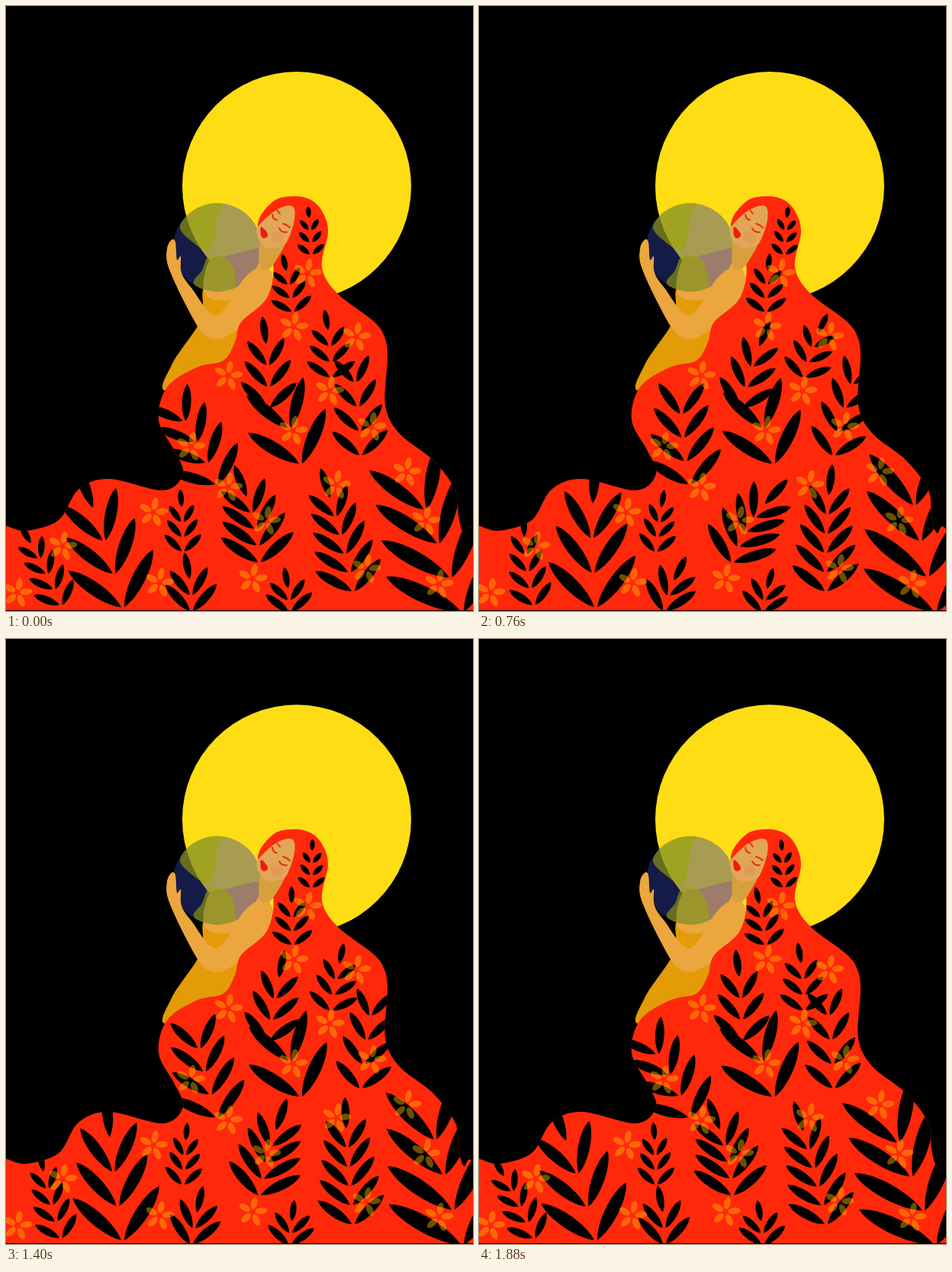
These frames come from a looping animation (612 px wide and 792 px high, 1.92 s). An HTML page with a canvas:

```html
<!DOCTYPE html>
<html lang="en">
<head>
<meta charset="utf-8">
<title>Sun, earth and swaying leaves</title>
<style>
html, body { margin: 0; width: 100%; height: 100%; overflow: hidden; background: #000; }
canvas { display: block; }
</style>
</head>
<body>
<canvas id="stage" width="612" height="792"></canvas>
<script>
const ctx = document.getElementById('stage').getContext('2d');
const LOOP = 1920, STEP = 40, TAU = Math.PI * 2, DEG = Math.PI / 180;
const SKIN = '#eca63e';

// Smooth closed path through x,y pairs
function blob(...p) {
  const path = new Path2D(), n = p.length / 2;
  const at = i => { const j = (i + n) % n * 2; return [p[j], p[j + 1]]; };
  path.moveTo(p[0], p[1]);
  for (let i = 0; i < n; i++) {
    const [a, b, c, d] = [at(i - 1), at(i), at(i + 1), at(i + 2)];
    path.bezierCurveTo(
      b[0] + (c[0] - a[0]) / 6, b[1] + (c[1] - a[1]) / 6,
      c[0] - (d[0] - b[0]) / 6, c[1] - (d[1] - b[1]) / 6, c[0], c[1]);
  }
  path.closePath();
  return path;
}

function disc(x, y, r) {
  const path = new Path2D();
  path.arc(x, y, r, 0, TAU);
  return path;
}

function fill(path, color) {
  ctx.fillStyle = color;
  ctx.fill(path);
}

const sun = disc(381, 236, 150), globe = disc(277, 316, 58);
const torso = blob(262,366, 310,350, 335,380, 300,470, 211,504, 217,470, 251,419, 258,395);
const chest = blob(266,334, 290,327, 335,317, 348,330, 335,365, 290,385, 260,376);
const arm = blob(217,306, 211,318, 213,342, 236,392, 257,427, 276,436, 297,428, 330,404,
  350,365, 343,342, 329,343, 310,359, 276,405, 243,369, 230,349, 229,328, 224,332, 222,309);
const north = blob(228,291, 236,275, 250,260, 284,258, 277,274, 274,300, 265,321, 242,307);
const south = blob(264,329, 276,326, 290,331, 300,350, 298,372, 270,376, 246,363, 257,346);
const face = blob(375,262, 378,280, 368,309, 357,316, 344,317, 334,310, 329,299, 331,288, 354,267);
const neck = blob(333,310, 347,314, 366,309, 354,333, 345,343, 333,342);
const lips = blob(334,289, 341,295, 343,301, 338,304, 334,300);
const lids = new Path2D('M349 273Q350 280 355 280M358 291Q361 297 368 296M363 285Q368 286 372 290M355 267L359 272');
const dress = blob(377,249, 400,254, 415,270, 422,296, 414,342, 434,376, 481,412, 496,433,
  500,460, 497,522, 515,559, 560,595, 589,634, 593,668, 600,690, 612,685, 650,760, 620,820,
  -20,820, -40,720, -12,681, 25,687, 69,673, 95,633, 135,619, 206,634, 232,612, 220,581,
  200,542, 211,499, 250,473, 285,464, 300,440, 308,414, 342,382, 350,336, 330,288, 350,256);

// Angles in degrees from upright; bend is how far the top turns over the sway
const ferns = [
  { x: 400, y: 325, h: 48, lean: 0, bend: 14, pairs: 3, len: 20, spread: 50 },
  { x: 376, y: 400, h: 54, lean: -4, bend: 22, pairs: 3, len: 30, spread: 54 },
  { x: 344, y: 526, h: 84, lean: 6, bend: 34, pairs: 3, len: 48, spread: 46 },
  { x: 386, y: 599, h: 98, lean: -17, bend: 6, pairs: 2, len: 78, spread: 41, tip: false },
  { x: 426, y: 486, h: 62, lean: 6, bend: 40, pairs: 3, len: 36, spread: 55 },
  { x: 465, y: 588, h: 128, lean: 4, bend: 38, pairs: 4, len: 47, spread: 47, tip: false },
  { x: 276, y: 626, h: 124, lean: -18, bend: 42, pairs: 4, len: 60, spread: 50, tip: false },
  { x: 72, y: 784, h: 90, lean: -18, bend: 32, pairs: 4, len: 36, spread: 46 },
  { x: 153, y: 787, h: 136, lean: -10, bend: 28, pairs: 3, len: 84, spread: 41 },
  { x: 232, y: 714, h: 58, lean: 2, bend: 16, pairs: 3, len: 31, spread: 45 },
  { x: 243, y: 792, h: 42, lean: 6, bend: 42, pairs: 2, len: 47, spread: 42 },
  { x: 332, y: 728, h: 88, lean: 7, bend: 72, pairs: 4, len: 58, spread: 52 },
  { x: 455, y: 766, h: 126, lean: -7, bend: 27, pairs: 5, len: 54, spread: 50 },
  { x: 598, y: 793, h: 190, lean: -16, bend: 18, pairs: 4, len: 108, spread: 46, tip: false },
  { x: 372, y: 793, h: 31, lean: 2, bend: 30, pairs: 2, len: 37, spread: 50 }
];

const flowers = [395,350, 377,420, 459,433, 291,484, 424,504, 242,577, 376,556, 479,551,
  525,610, 550,674, 433,627, 291,630, 341,674, 193,663, 74,707, 15,768, 201,755, 323,750,
  472,737, 567,757];

function leaf(x, y, angle, len) {
  const w = (4 + len * .16) / 1.5;
  ctx.save();
  ctx.translate(x, y);
  ctx.rotate(angle * DEG);
  ctx.beginPath();
  ctx.moveTo(0, 0);
  ctx.bezierCurveTo(w, -len * .25, w, -len * .8, 0, -len);
  ctx.bezierCurveTo(-w, -len * .8, -w, -len * .25, 0, 0);
  ctx.fill();
  ctx.restore();
}

// Climbs the curved stem, setting a pair of leaves at each knot
function drawFern({ x, y, h, lean, bend, pairs, len, spread, tip = true }, sway) {
  const gap = h / pairs;
  for (let i = 0; i <= pairs; i++) {
    const u = i / pairs;
    const axis = lean + bend * (sway - .4) * (.4 + .6 * u);
    const size = len * (1 - .25 * u), open = spread * (1 - .4 * u);
    if (i < pairs) {
      leaf(x - 2, y, axis - open, size);
      leaf(x + 2, y, axis + open, size);
    } else if (tip) {
      leaf(x, y, axis, size);
    }
    x += Math.sin(axis * DEG) * gap;
    y -= Math.cos(axis * DEG) * gap;
  }
}

function drawFlower(x, y) {
  ctx.beginPath();
  for (let k = 0; k < 5; k++) {
    const a = k * TAU / 5 - .12, c = Math.cos(a), s = Math.sin(a);
    ctx.moveTo(x + c * 19.5, y + s * 19.5);
    ctx.ellipse(x + c * 11.5, y + s * 11.5, 8, 4.2, a, 0, TAU);
  }
  ctx.fill();
}

// Sea and land are see-through, so sun, skin and night tint them
function drawGlobe() {
  ctx.save();
  ctx.clip(globe);
  fill(globe, 'rgba(48,64,169,.42)');
  fill(north, 'rgba(156,167,3,.6)');
  fill(south, 'rgba(156,167,3,.6)');
  ctx.restore();
}

function drawFace() {
  fill(neck, '#d6a03e');
  fill(face, '#e2a658');
  fill(disc(355, 303, 8), 'rgba(226,140,90,.4)');
  fill(lips, '#e8200c');
  ctx.strokeStyle = '#e8300f';
  ctx.lineWidth = 2;
  ctx.lineCap = 'round';
  ctx.stroke(lids);
}

function draw(now) {
  const t = Math.floor(now % LOOP / STEP) * STEP;
  const sway = (1 - Math.cos(t / LOOP * TAU)) / 2;

  ctx.fillStyle = '#000';
  ctx.fillRect(0, 0, 612, 792);
  fill(sun, '#fedd14');
  fill(torso, '#e49b08');
  fill(chest, SKIN);
  drawGlobe();
  fill(arm, SKIN);
  fill(dress, '#ff280a');

  ctx.save();
  ctx.clip(dress);
  ctx.fillStyle = '#000';
  for (const fern of ferns) drawFern(fern, sway);
  ctx.restore();

  ctx.fillStyle = 'rgba(255,190,0,.42)';
  for (let i = 0; i < flowers.length; i += 2) drawFlower(flowers[i], flowers[i + 1]);
  drawFace();
  ctx.fillStyle = '#000';
  ctx.fillRect(0, 791, 612, 1);
}

let start;
function tick(now) {
  start ??= now;
  draw(now - start);
  requestAnimationFrame(tick);
}
draw(0);
requestAnimationFrame(tick);
</script>
</body>
</html>
```
